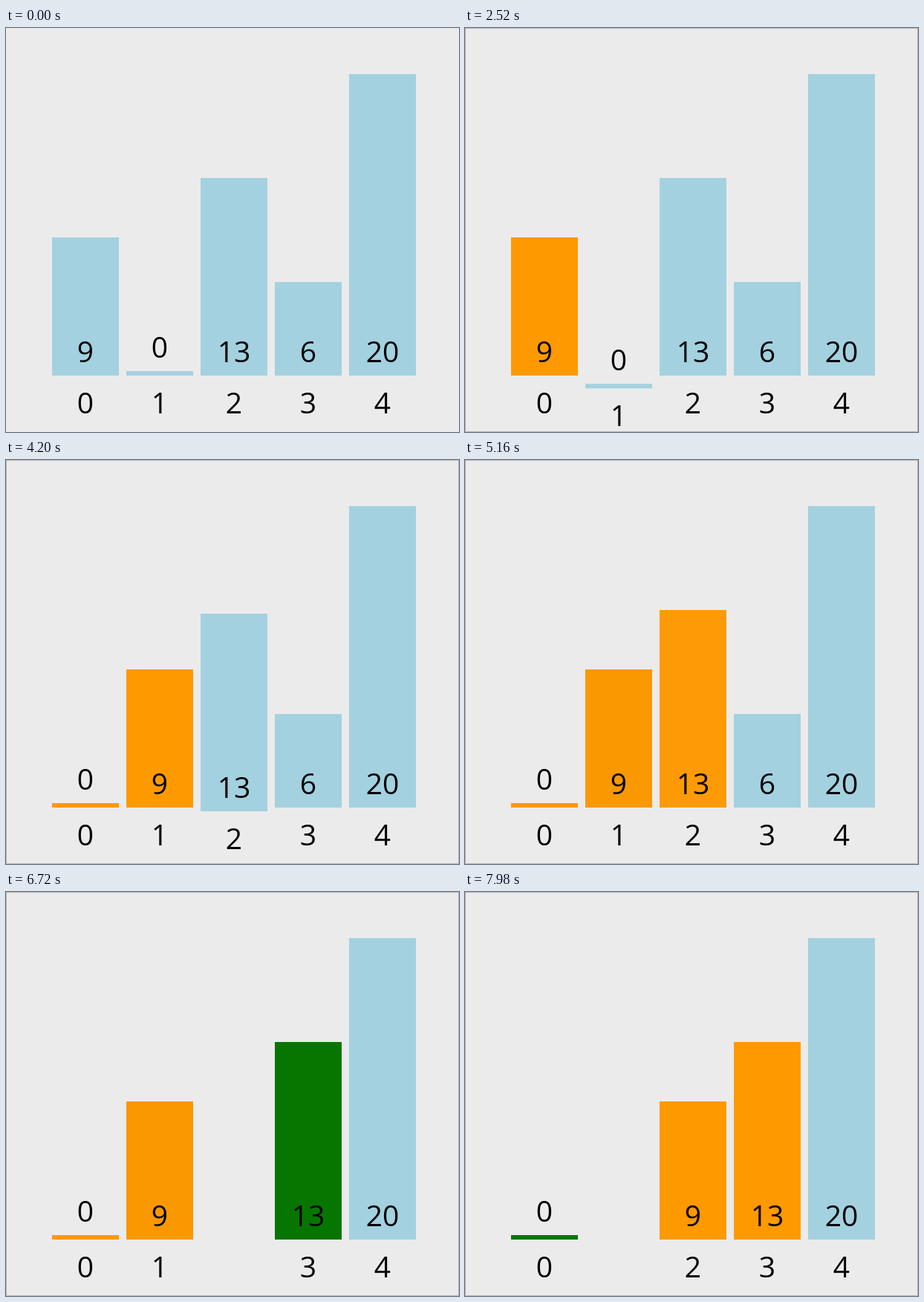
These frames come from a looping animation (610 by 544 pixels, 8 s). An HTML page with a canvas:

```html
<!DOCTYPE html>
<html lang="en">
<head>
<meta charset="utf-8">
<title>Insertion sort</title>
<style>
html, body { margin: 0; width: 610px; height: 544px; overflow: hidden; background: #ebebeb; }
canvas { display: block; }
</style>
</head>
<body>
<canvas id="stage" width="610" height="544"></canvas>
<script>
const ctx = document.getElementById('stage').getContext('2d');
const LOOP = 8000, TICK = 60;
const BASE = 468, UNIT = 20, MIN = 6, WIDTH = 90, PITCH = 100, LEFT = 62;
const FALL = 500, FALL_MS = 70;
const BLUE = [163, 209, 224], ORANGE = [255, 153, 0], GREEN = [0, 117, 0];

// Tracks hold [start, end, value]; drop and rise are start times.
const bars = [
  { value: 9, slot: 0,
    moves: [[3310, 3600, 1], [7090, 7380, 2]],
    tints: [[2060, 2340, ORANGE], [2780, 3180, GREEN], [3800, 4020, ORANGE], [4520, 4800, GREEN],
            [4980, 5180, ORANGE], [6700, 6900, GREEN], [7440, 7740, ORANGE]] },
  { value: 0, slot: 1, drop: 2507, rise: 3770,
    moves: [[3000, 3060, 0]],
    tints: [[3800, 4020, ORANGE], [7440, 7740, GREEN]] },
  { value: 13, slot: 2, drop: 4193, rise: 5005,
    moves: [[6190, 6480, 3]],
    tints: [[4980, 5180, ORANGE], [5660, 6000, GREEN], [6700, 6900, ORANGE]] },
  { value: 6, slot: 3, drop: 5453, moves: [], tints: [] },
  { value: 20, slot: 4, moves: [], tints: [] }
];

const mix = (a, b, k) => a + (b - a) * k;
const progress = (t, start, end) => Math.min(1, Math.max(0, (t - start) / (end - start)));
const swing = p => 0.5 - Math.cos(p * Math.PI) / 2;

function follow(track, first, t, blend) {
  return track.reduce((now, [start, end, next]) => blend(now, next, swing(progress(t, start, end))), first);
}

function fallOffset(bar, t) {
  if (bar.drop === undefined || t < bar.drop) return 0;
  if (bar.rise !== undefined && t >= bar.rise) {
    return FALL * (1 - progress(t, bar.rise, bar.rise + FALL_MS)) ** 2;
  }
  return FALL * progress(t, bar.drop, bar.drop + FALL_MS) ** 2;
}

function drawBar(bar, t) {
  const slot = follow(bar.moves, bar.slot, t, mix);
  const tint = follow(bar.tints, BLUE, t, (a, b, k) => a.map((c, i) => mix(c, b[i], k)));
  const x = LEFT + slot * PITCH;
  const mid = x + WIDTH / 2;
  const bottom = BASE + fallOffset(bar, t);
  const height = MIN + bar.value * UNIT;

  ctx.fillStyle = `rgb(${tint.map(Math.round).join(',')})`;
  ctx.fillRect(x, bottom - height, WIDTH, height);
  ctx.fillStyle = '#000';
  ctx.fillText(bar.value, mid, bottom - 18 - (bar.value ? 0 : MIN));
  ctx.fillText(Math.round(slot), mid, bottom + 51);
}

function draw(t) {
  ctx.fillStyle = '#ebebeb';
  ctx.fillRect(0, 0, 610, 544);
  ctx.font = '39px "Open Sans", "Noto Sans", sans-serif';
  ctx.textAlign = 'center';
  ctx.textBaseline = 'alphabetic';
  bars.forEach(bar => drawBar(bar, t));
  ctx.strokeStyle = `rgba(0,0,0,${0.24 * progress(t, 480, 1320)})`;
  ctx.lineWidth = 1;
  ctx.strokeRect(0.5, 0.5, 609, 543);
}

const begin = performance.now();
function frame() {
  const t = (performance.now() - begin) % LOOP;
  draw(Math.floor(t / TICK) * TICK);
  requestAnimationFrame(frame);
}
frame();
</script>
</body>
</html>
```
